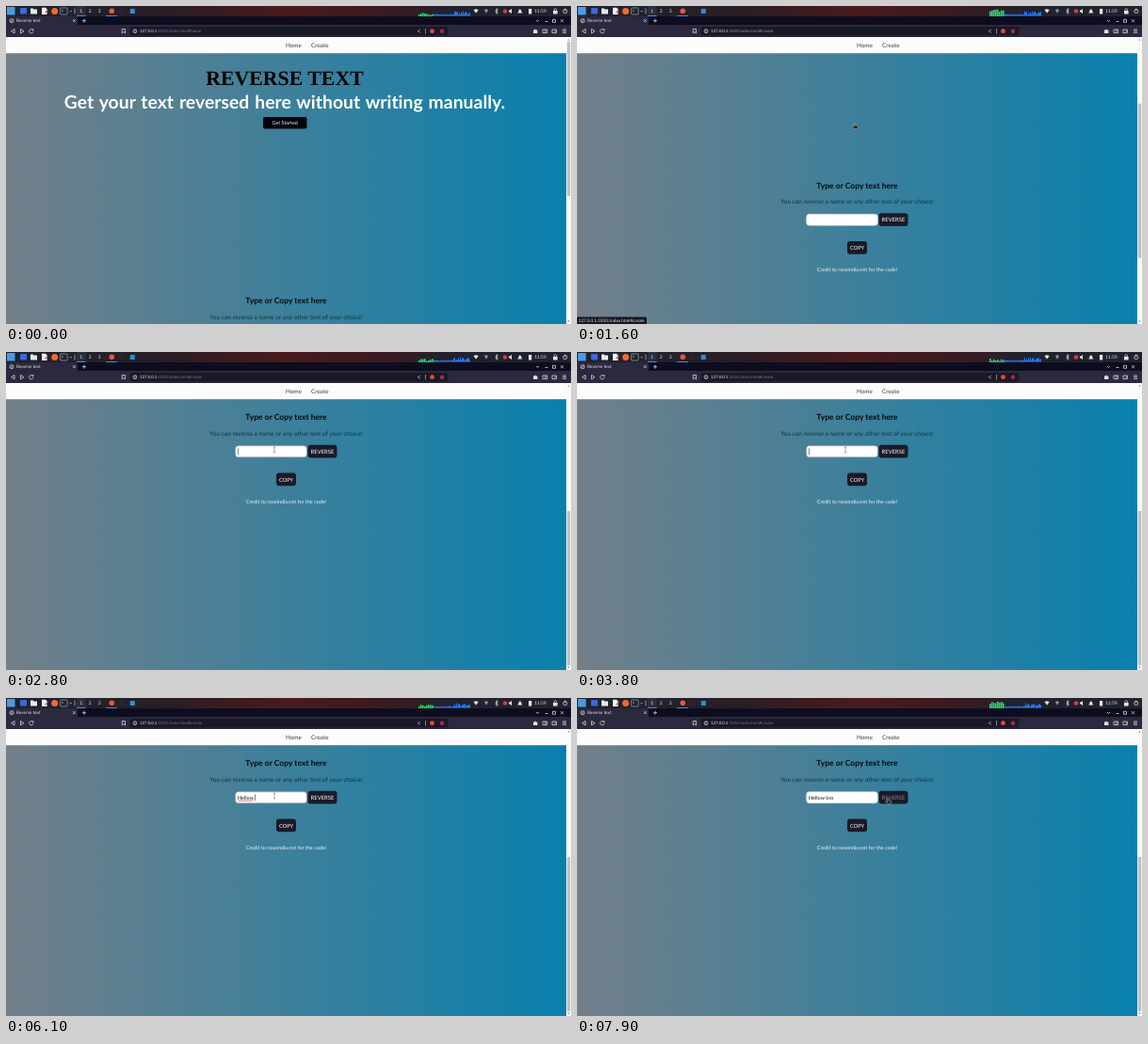
An HTML page that plays this animation: 600 by 338 pixels, repeating every 8 s.

```html
<!DOCTYPE html>
<html lang="en">
<head>
<meta charset="utf-8">
<title>Reverse text</title>
<style>
  html, body { margin: 0; width: 100%; height: 100%; overflow: hidden; background: #2b293d; }
  svg { display: block; width: 100vw; height: 100vh; text-rendering: geometricPrecision; }
  text { font-family: Lato, 'Open Sans', sans-serif; font-variant-ligatures: none; white-space: pre; }
  .mid { text-anchor: middle; }
  .line { fill: none; stroke: #d5d5dc; stroke-width: .8; }
</style>
</head>
<body>
<svg viewBox="0 0 600 338" preserveAspectRatio="none">
  <defs>
    <linearGradient id="sky"><stop stop-color="#737f89"/><stop offset="1" stop-color="#0880ad"/></linearGradient>
    <linearGradient id="panel">
      <stop offset=".12" stop-color="#20222e"/><stop offset=".3" stop-color="#2c1d24"/>
      <stop offset=".5" stop-color="#4a1a1c"/><stop offset=".68" stop-color="#381b21"/>
      <stop offset=".8" stop-color="#20222e"/>
    </linearGradient>
    <clipPath id="view"><rect y="50" width="595" height="288"/></clipPath>
    <path id="hand" d="M-1.3-2.2q.8-.7 1.3 0v2l2.4.6q.7.3.5 1.2l-.7 2.2h-3.2l-2.3-2.6q0-1 1-.6l1 .6z"
          fill="#222" stroke="#b9b9b9" stroke-width=".6"/>
    <path id="beam" d="M-1.2-3.2q1.2 0 1.2.8v4.8q0 .8-1.2.8M1.2-3.2q-1.2 0-1.2.8M0 2.4q0 .8 1.2.8"
          fill="none" stroke="#666" stroke-width=".6"/>
  </defs>

  <!-- page -->
  <rect y="50" width="595" height="288" fill="url(#sky)"/>
  <g clip-path="url(#view)">
    <g id="page" class="mid">
      <text x="296" y="84.2" font-size="21.8" font-weight="700" style="font-family:'Liberation Serif',serif">REVERSE TEXT</text>
      <text x="296" y="109" font-size="19.4" font-weight="700" fill="#fff" style="word-spacing:.06em">Get your text reversed here without writing manually.</text>
      <rect x="273" y="118" width="46.5" height="12.5" rx="2" fill="#05050f"/>
      <text x="296.2" y="126.2" font-size="5.4" fill="#f2f2f2">Get Started</text>
      <g transform="translate(0 244)">
        <text x="297.5" y="72.2" font-size="8.55" font-weight="700" fill="#050a0e">Type or Copy text here</text>
        <text x="297.5" y="88.6" font-size="6.62" fill="#0e343f">You can reverse a name or any other text of your choice!</text>
        <rect id="field" x="243.7" y="99.8" width="75.6" height="11.9" rx="3" fill="#fff" stroke-width=".7"/>
        <text id="typed" x="246" y="107.8" font-size="5.5" fill="#111" style="text-anchor:start"></text>
        <path id="squiggle" fill="none" stroke="#d22" stroke-width=".6"/>
        <rect id="caret" y="102.3" width=".6" height="6.8" fill="#333"/>
        <rect x="320.5" y="98.8" width="31" height="13.8" rx="3" fill="#1a1a29"/>
        <text id="reverse" x="336" y="107.8" font-size="5.9">REVERSE</text>
        <rect x="287" y="128.5" width="21" height="13.8" rx="3" fill="#1a1a29"/>
        <text x="297.5" y="137.5" font-size="5.7" fill="#fff">COPY</text>
        <text x="297.5" y="160.5" font-size="5.48" fill="#f0f4f6">Credit to roseindia.net for the code!</text>
      </g>
    </g>
  </g>
  <rect y="33" width="595" height="17.2" fill="#fcfcfd"/>
  <g class="mid" font-size="6.35" fill="#3c3c44">
    <text x="305.5" y="43.9">Home</text><text x="333.3" y="43.9">Create</text>
  </g>
  <rect x="595" y="33" width="5" height="305" fill="#fafafa"/>
  <path d="M596.4 36.6l1.1-1.3 1.1 1.3zM596.4 334.6l1.1 1.3 1.1-1.3z" fill="#666"/>
  <rect id="thumb" x="595.8" width="3.4" height="164" fill="#bfc0c3"/>
  <g id="status">
    <path d="M0 330.5h72q2 0 2 2v5.5h-74z" fill="#15161f"/>
    <text x="1.5" y="336" font-size="4.66" fill="#e4e4e8">127.0.0.1:5500/index.html#create</text>
  </g>

  <!-- browser -->
  <rect y="11" width="600" height="9.5" fill="#0e0d20"/>
  <rect y="20" width="600" height="13" fill="#2b293d"/>
  <path d="M0 11h74q2 0 2 2v7.5h-76z" fill="#2b293d"/>
  <circle class="line" cx="6" cy="15.7" r="2"/><path class="line" d="M4.8 17l2.5-2.6"/>
  <text x="11" y="17.3" font-size="4.7" fill="#e6e6ea">Reverse text</text>
  <path class="line" d="M71 14.2l2.8 2.8m0-2.8l-2.8 2.8M83 13.7v4m-2-2h4M563 15l1.5 1.5 1.5-1.5M572.5 16.5h3M580.5 14.3h3v3h-3zM589 14.2l3 3m0-3l-3 3"/>
  <path class="line" d="M9 24.5L5.5 26.7 9 29zM15.5 24.5l3.5 2.2-3.5 2.3z"/>
  <path class="line" d="M28.4 25.2a2.2 2.2 0 1 0 .6 1.7M29 24v1.7h-1.7M123.3 24.5h3.2v4.4l-1.6-1.3-1.6 1.3z"/>
  <rect x="131.5" y="22" width="338" height="9.4" rx="2" fill="#1a1928"/>
  <circle class="line" cx="137" cy="26.7" r="1.9"/><path class="line" d="M137 26.5v1.2M137 25.4v.5"/>
  <text x="142" y="28.4" font-size="4.4" fill="#ededf0">127.0.0.1<tspan id="address"></tspan></text>
  <path class="line" d="M440 25l-2.8 1.7 2.8 1.7M445.5 24v5.5" stroke-opacity=".7"/>
  <circle cx="452.5" cy="26.7" r="2.4" fill="#ed4a30"/>
  <circle cx="463" cy="26.7" r="2.2" fill="#a62a4c"/>
  <path d="M560 25.5h1.2q.8-1.8 1.6 0h1.6v3.4h-4.4z" fill="#dedee4"/>
  <path class="line" d="M570 25h4.6v3.6h-4.6zM572.8 25v3.6M580 25h4.4v3.6h-4.4zM582.5 26.8h2M591 25h4M591 26.7h4M591 28.4h4"/>

  <!-- desktop panel -->
  <rect width="600" height="11" fill="url(#panel)"/>
  <rect x="1" y="1" width="8.5" height="8.5" fill="#4c9ae6"/>
  <rect x="15" y="2" width="7" height="6.5" rx=".8" fill="#3f67dc"/>
  <path d="M26 2.5h2.7l.8 1h3.5v5h-7z" fill="#e7e9ef"/>
  <path d="M38 1.8h4l1.5 1.5v5.8h-5.5z" fill="#f4f4f4"/><path d="M41 7l3-3 .8.8-3 3z" fill="#db4a42"/>
  <circle cx="51.7" cy="5.5" r="3.5" fill="#f2692c"/>
  <rect x="57.6" y="2" width="7.6" height="7" rx=".8" fill="#20242b" stroke="#b8bcc5" stroke-width=".6"/>
  <path class="line" d="M59.3 4l1.2 1-1.2 1M67.5 5l1.2 1.2L69.9 5M73 2.5v6" stroke-opacity=".8"/>
  <rect x="75" y="0" width="9.5" height="11" fill="#2b3040"/><rect x="75" y="10" width="9.5" height="1" fill="#3b8ce8"/>
  <g class="mid" font-size="5" fill="#e6e6ea">
    <text x="79.7" y="7.3">1</text><text x="89.3" y="7.3">2</text><text x="99.3" y="7.3">3</text>
    <text x="567.5" y="7.3" font-size="4.9">11:59</text>
  </g>
  <rect x="106" y="10" width="12" height="1" fill="#3b8ce8"/>
  <circle cx="112.3" cy="5.3" r="2.8" fill="#e8573f"/>
  <circle cx="123.2" cy="5.5" r="3" fill="#26272b"/>
  <rect x="131.8" y="3" width="5" height="5" fill="#2493d8"/>
  <path id="cpu" fill="#27d96b"/>
  <path id="net" fill="#2878e8"/>
  <path d="M496.5 4.2q2.6-2 5.2 0l-2.6 3.4z" fill="#e6e6ea"/>
  <path d="M508 4.2q2-2 4 0l-2 3.5z" fill="#8d919d"/>
  <path class="line" d="M519.7 4l2.6 3-1.3 1.3V2.6l1.3 1.2-2.6 3"/>
  <circle cx="530" cy="5.5" r="2.3" fill="#d53b46"/>
  <path d="M534 4.5h1.3l1.7-1.7v5.4l-1.7-1.7H534zM543.2 7.5q1.2-1 1.2-2.8 1.4-3 2.8 0 0 1.8 1.2 2.8zM555 3h3.2v5.4H555zM581 5h4.6v3.5H581z" fill="#e6e6ea"/>
  <path class="line" d="M582 5V3.5q1.3-1.6 2.6 0V5"/>
  <circle class="line" cx="593.8" cy="5.6" r="2.1"/><path class="line" d="M593.8 2.5v3"/>

  <use id="pointer"/>
</svg>
<script>
const LOOP = 8000, SCROLL = 244, MESSAGE = 'Hellow bro';
const KEY_TIMES = [4900, 5100, 5300, 5450, 5650, 5850, 6000, 6400, 6600, 6800];
const FOCUS = 2700, PRESS = 7600;
const $ = id => document.getElementById(id);
const set = (id, attrs) => Object.entries(attrs).forEach(([k, v]) => $(id).setAttribute(k, v));
const show = (id, on) => set(id, { visibility: on ? 'visible' : 'hidden' });
const ease = (t, from, to) => {
  const p = Math.min(1, Math.max(0, (t - from) / (to - from)));
  return p * p * (3 - 2 * p);
};
const rand = n => { const x = Math.sin(n * 127.1 + 3.7) * 43758.5; return x - Math.floor(x); };

function drawMeters(t) {
  const step = Math.floor(t / 800);
  const busy = (t > 1200 && t < 2400) || t > 7200;
  let cpu = '', net = '';
  for (let i = 0; i < 8; i++) {
    const h = (busy ? 5 : 1.5) + rand(step * 8 + i) * 2.5;
    cpu += `M${438 + i * 2} ${11 - h}h1.6v${h}h-1.6z`;
  }
  for (let i = 0; i < 39; i++) {
    const n = i + step, h = 1.2 + rand(n + 90) * (i > 20 ? 4 : .8);
    net += `M${454 + i} ${10.6 - h}h1v${h}h-1z`;
  }
  set('cpu', { d: cpu });
  set('net', { d: net });
}

function drawField(t) {
  const count = KEY_TIMES.filter(k => k <= t).length;
  const focused = t >= FOCUS && t < PRESS;
  $('typed').textContent = MESSAGE.slice(0, count);
  const end = count ? $('typed').getComputedTextLength() : 0;
  const lastKey = count ? KEY_TIMES[count - 1] : FOCUS;
  set('caret', { x: 246 + end });
  show('caret', focused && (t - lastKey) % 1000 < 500);
  set('field', { stroke: focused ? '#a9a5c0' : '#d8dde0' });

  const wordEnd = count > 6 ? 246 + $('typed').getSubStringLength(0, 6) : 246;
  let wave = 'M246 109.2';
  for (let x = 247, up = 1; x < wordEnd; x++, up = -up) wave += `L${x} ${109.2 - up * .3}`;
  set('squiggle', { d: wave });
  show('squiggle', count > 6 && focused);
}

function drawPointer(t) {
  const toField = ease(t, 2150, 2600), toButton = ease(t, 7050, 7500);
  const x = 295.5 - 10.5 * toField + 46 * toButton;
  const y = 127 - 23 * toField + 5 * toButton;
  const overField = t > 2500 && x < 320;
  set('pointer', { href: overField ? '#beam' : '#hand', transform: `translate(${x} ${y})` });
  show('pointer', t >= 600);
  set('reverse', { fill: x > 321 ? '#85838e' : '#fff' });
}

function draw(t) {
  const scroll = ease(t, 1250, 1950);
  set('page', { transform: `translate(0 ${-SCROLL * scroll})` });
  set('thumb', { y: 38 + 131 * scroll });
  const hovering = t >= 600 && t < 2200;
  show('status', hovering);
  $('address').textContent = ':5500/index.html#' + (t < 1250 ? 'home' : 'create');
  set('address', { fill: hovering && t >= 1250 ? '#92939c' : '#72737e' });
  drawField(t);
  drawPointer(t);
  drawMeters(t);
}

const start = performance.now();
function tick() {
  draw((performance.now() - start) % LOOP);
  requestAnimationFrame(tick);
}
tick();
</script>
</body>
</html>
```
